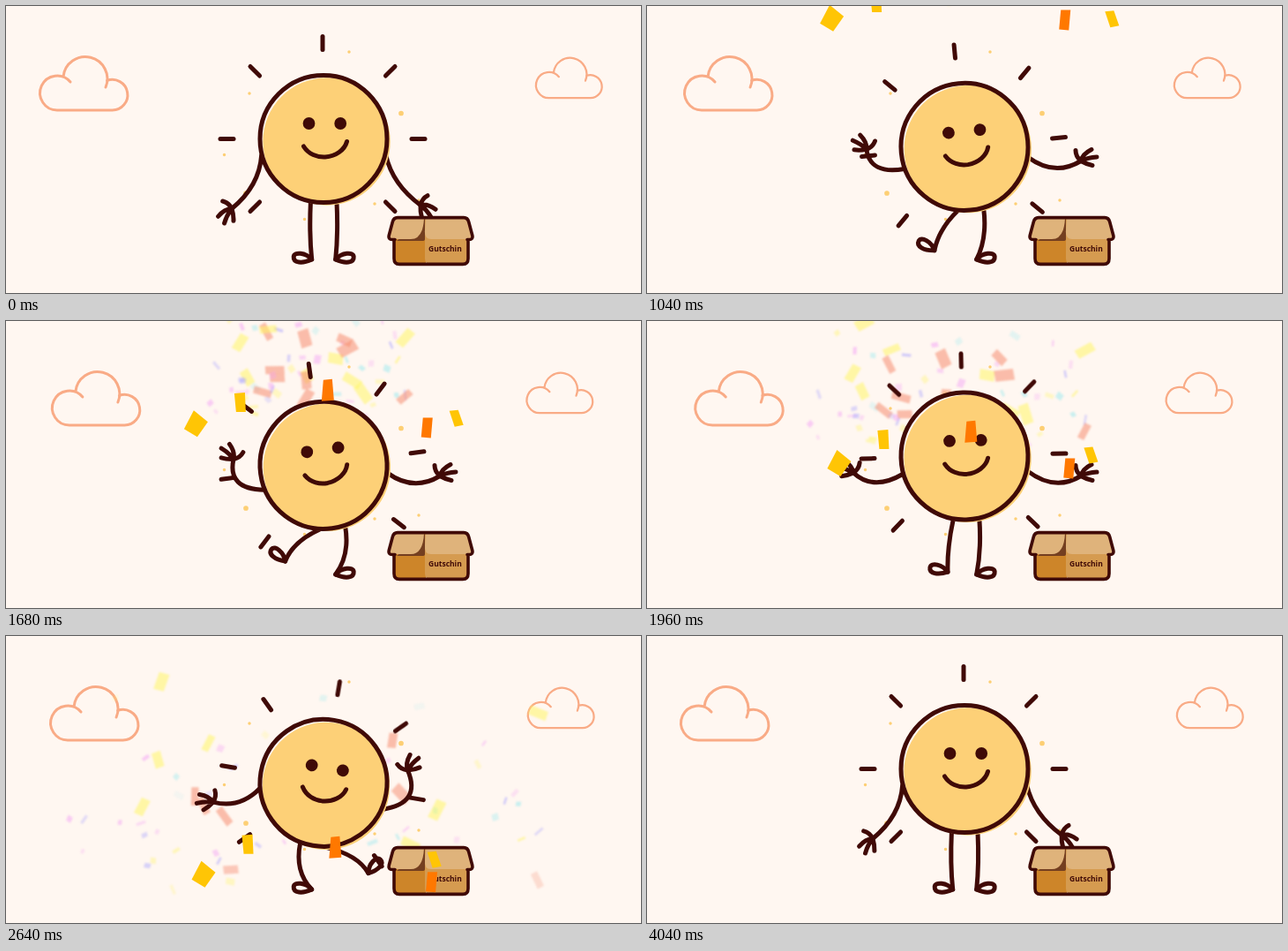
Recreate the animation shown at these times as an HTML page. Size 720x325 px, loop 4080 ms.

```html
<!DOCTYPE html>
<html lang="de">
<head>
<meta charset="utf-8">
<title>Confetti sun</title>
<style>
html, body { margin: 0; width: 100%; height: 100%; overflow: hidden; background: #fff7f1; }
svg { display: block; width: 720px; height: 325px; }
.ink { fill: none; stroke: #400a07; stroke-width: 5; stroke-linecap: round; stroke-linejoin: round; }
.thin { stroke-width: 3.6; }
.cloud { fill: none; stroke: #f9ab86; stroke-width: 3; stroke-linecap: round; }
.dots { stroke: #fdcf74; stroke-linecap: round; }
#soft { filter: blur(.8px); }
text { font: 700 8.5px "Open Sans", sans-serif; fill: #400a07; }
</style>
</head>
<body>
<svg viewBox="0 0 720 325">
  <defs>
    <path id="cloud" d="M73 86A19.5 19.5 0 1 0 58.500 118H120.500A17.300 17.300 0 1 0 114.500 84.500M65 80A25 25 0 1 1 113 92"/>
    <path id="hand" d="M0 0Q-6-5-6-12M0 0Q2-8 12-13M0 0Q8-4 18-4.500M0 0Q7 4 13 5"/>
    <path id="foot" d="M0 0C7-8 20-9 20.500-3C21 4 11 5 0 0Z"/>
  </defs>
  <g id="cloudL" class="cloud"><use href="#cloud"/></g>
  <g id="cloudR" class="cloud"><use href="#cloud"/></g>
  <g class="dots">
    <path stroke-width="3.5" d="M389 52h0M276 99h0M247.500 168.500h0M418 224h0M338.500 241.500h0M468 220h0"/>
    <path stroke-width="5.7" d="M448 121.500h0M272 212h0"/>
  </g>
  <g id="soft"></g>
  <g id="rays" class="ink"></g>
  <g id="limbs" class="ink"></g>
  <g id="sun">
    <circle cx="360" cy="150.5" r="72" fill="#fff7f1"/>
    <circle cx="363.5" cy="153.5" r="72.2" fill="#fdd077"/>
    <circle class="ink" cx="360" cy="150.5" r="72"/>
    <g fill="#400a07"><circle cx="343.5" cy="133" r="6.9"/><circle cx="379.2" cy="133" r="6.9"/></g>
    <path class="ink" d="M337.500 159C343 168 353 171.500 362 171C374 170 384 163 386.500 153.500"/>
  </g>
  <g>
    <path fill="#cd8529" d="M440 241H476V292H446Q440 292 440 286Z"/>
    <path fill="#d59b50" d="M475 241H524V286Q524 292 518 292H481Q475 292 475 286Z"/>
    <path fill="#743f20" d="M475 241V264Q475 266 472 266H443Z"/>
    <path fill="#dfb37b" d="M440 240H474Q473 264 459 264H434ZM476 240H523L529 264H482Q474 264 475 254Z"/>
    <path class="ink thin" d="M440 265V286Q440 292.400 446 292.400H518Q524 292.400 524 286V265M441 264.500H438Q433 264.500 434.300 259.500L438.300 244.500Q439.500 239.600 444 239.600H519Q523.500 239.600 524.700 244.500L528.700 259.500Q530 264.500 525 264.500H523"/>
    <text x="479" y="278">Gutschin</text>
  </g>
  <g id="crisp">
    <path fill="#ffc505" d="M210 50L226 63L214 80L199 71Z"/>
    <path fill="#ffc505" d="M256 34L268 33L269 55L258 55Z"/>
    <path fill="#ff7800" d="M357 13L367 12L369 36L355 37Z"/>
    <path fill="#ff7800" d="M471 57L482 57L480 80L469 79Z"/>
    <path fill="#ffc505" d="M511 54L521 53L527 70L517 72Z"/>
  </g>
</svg>
<script>
const LOOP = 4080, STEP = 40, AXIS = 360.2, SUN_Y = 150.5;
const $ = id => document.getElementById(id);
const add = (parent, tag, attrs = {}) => {
  const el = document.createElementNS('http://www.w3.org/2000/svg', tag);
  for (const k in attrs) el.setAttribute(k, attrs[k]);
  return parent.appendChild(el);
};
const ramp = (t, a, b) => Math.max(0, Math.min(1, (t - a) / (b - a)));
const ease = (t, a, b) => (1 - Math.cos(Math.PI * ramp(t, a, b))) / 2;
const hump = (t, a, b) => Math.sin(Math.PI * ramp(t, a, b)) ** 2;
const mix = (a, b, k) => a.map((v, i) => v + (b[i] - v) * k);
const move = (el, transform) => el.setAttribute('transform', transform);

for (let i = 0; i < 8; i++) if (i !== 4) {
  add($('rays'), 'path', { d: 'M359 49.500V34.500', transform: `rotate(${i * 45} 359 ${SUN_Y})` });
}

// A pose is control point, end point and turn; x counts outwards from the body axis.
const ARM = { joint: [70.5, 18.5], end: '#hand', out: [102, 193.5, 131.8, 175.5, 0], up: [113, 189, 89, 148, -40] };
const LEG = { joint: [14.8, 71.5], end: '#foot', rest: [16.5, 258, 13.5, 287, 0], kick: [43, 246, 57, 265.5, -48], stand: [36, 268, 13.5, 287, 0] };

const limb = (side, kind) => ({
  side, ...kind, line: add($('limbs'), 'path'), tip: add($('limbs'), 'use', { href: kind.end })
});
const armL = limb(-1, { ...ARM, down: [73, 204, 104.2, 229.5, 77] });
const armR = limb(1, { ...ARM, down: [78, 202, 109.8, 225.5, 63] });
const legL = limb(-1, LEG);
const legR = limb(1, LEG);

function drawLimb({ side, joint, line, tip }, [cx, cy, x, y, turn], body) {
  const a = body.angle * Math.PI / 180, c = Math.cos(a), s = Math.sin(a);
  const jx = side * joint[0], jy = joint[1];
  const at = dx => AXIS + side * dx;
  line.setAttribute('d', `M${AXIS + jx * c - jy * s} ${body.y + jx * s + jy * c}Q${at(cx)} ${cy} ${at(x)} ${y}`);
  move(tip, `translate(${at(x)} ${y}) scale(${side} 1) rotate(${turn})`);
}

let seed = 11;
const rnd = (a, b) => {
  seed = (seed * 16807) % 2147483647;
  return a + (b - a) * seed / 2147483647;
};
const tints = ['#f58c70', '#fff566', '#f3a4f5', '#a9a4ff', '#fff566', '#f3a4f5', '#9be9ef'];

// Blurred flakes burst from above the head; every seventh salmon or yellow one is large.
const flakes = Array.from({ length: 64 }, (_, i) => {
  const big = i % 7 < 2, w = big ? rnd(8, 13) : rnd(2, 8), h = big ? rnd(15, 25) : rnd(5, 12);
  return {
    vx: rnd(-.18, .16), y: rnd(-30, 80), g: rnd(.000025, .00009), turn: rnd(0, 360), spin: rnd(-.08, .08), end: rnd(2750, 3250),
    el: add($('soft'), 'path', { d: `M${-w / 2} ${-h / 2}h${w}l${-w / 8} ${h}h${-w}Z`, fill: tints[i % 7], 'fill-opacity': big ? .55 : rnd(.25, .55) })
  };
});

function drawConfetti(t) {
  const fall = t - 1360;
  [...$('crisp').children].forEach((el, i) => {
    // The outermost flake curls back inwards.
    const vx = .009 - .035 * (i / 4) ** 8, vy = .16 - .011 * Math.sin(1.96 * i);
    move(el, `translate(${vx * fall} ${vy * fall})`);
  });
  $('crisp').setAttribute('opacity', t > 960 ? 1 - ramp(t, 3080, 3360) : 0);

  const age = Math.max(0, t - 1000), above = Math.max(0, -fall) * .25;
  for (const f of flakes) {
    move(f.el, `translate(${345 + f.vx * age} ${f.y + f.g * age * age - above}) rotate(${f.turn + f.spin * age})`);
    f.el.setAttribute('opacity', ramp(t, 960, 1200) * (1 - ramp(t, f.end - 250, f.end)));
  }
}

function draw(t) {
  const left = hump(t, 690, 2130), right = hump(t, 2160, 3440);
  const body = { y: SUN_Y + 18.6 * (left + right), angle: 11.3 * (right - left) };
  const pose = `translate(0 ${body.y - SUN_Y}) rotate(${body.angle} ${AXIS} ${SUN_Y})`;
  move($('sun'), pose);
  move($('rays'), pose);

  const drift = 16.6 * (ease(t, 520, 2100) - ease(t, 2100, 3640));
  move($('cloudL'), `translate(${drift} 0)`);
  move($('cloudR'), `translate(${572 - .755 * drift} 15.500) scale(.752)`);

  const raised = ease(t, 0, 600);
  const arm = (a, up, lowered) => drawLimb(a, mix(mix(a.out, a.up, up), a.down, 1 - raised + lowered), body);
  const leg = (l, kick, stand) => drawLimb(l, mix(mix(l.rest, l.kick, kick), l.stand, stand), body);
  arm(armL, left, ease(t, 1960, LOOP));
  arm(armR, right, ease(t, 3160, LOOP));
  leg(legL, left, right);
  leg(legR, right, left);
  drawConfetti(t);
}

const start = performance.now();
function tick() {
  const t = (performance.now() - start) % LOOP;
  draw(Math.floor(t / STEP) * STEP);
  requestAnimationFrame(tick);
}
tick();
</script>
</body>
</html>
```
